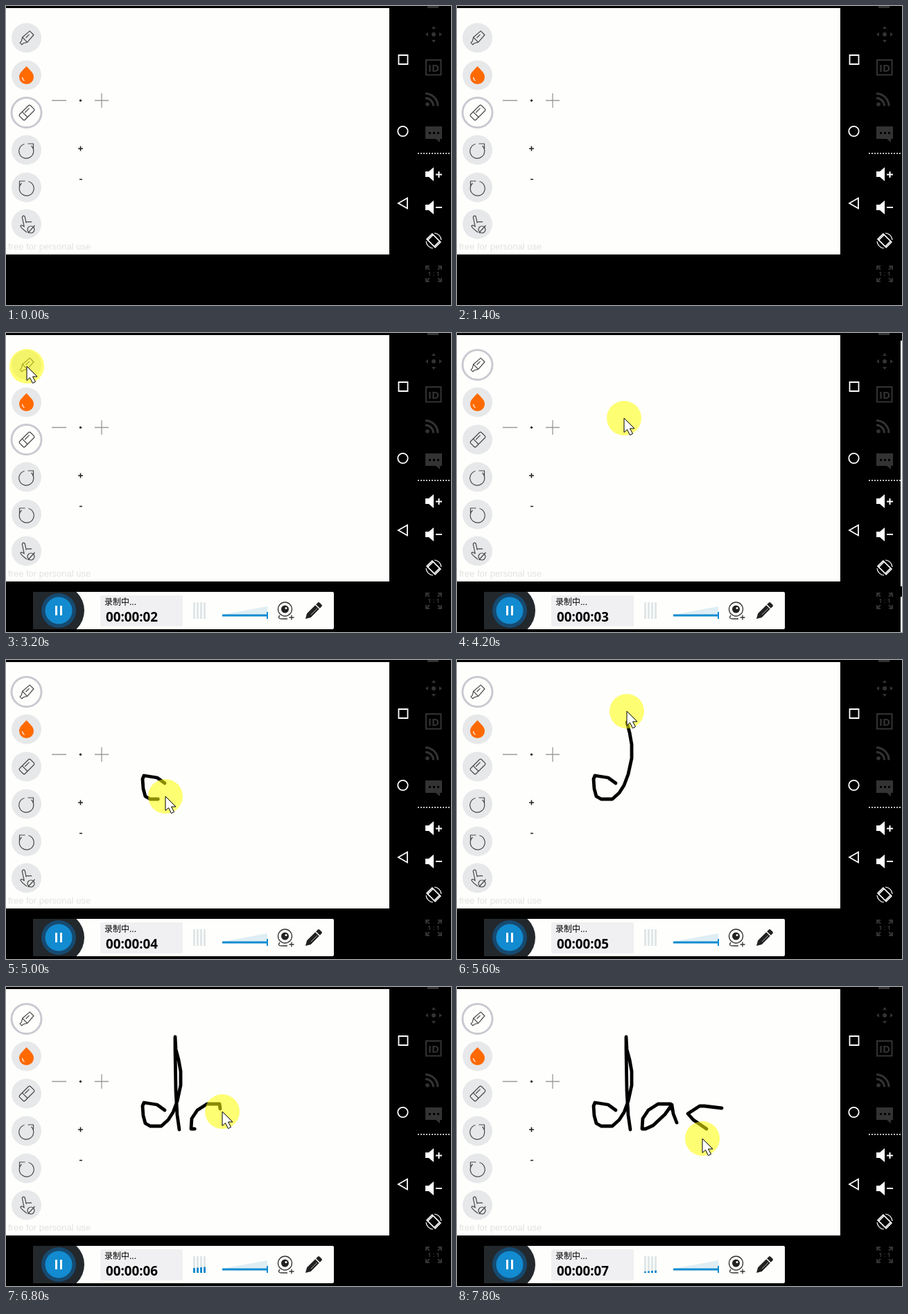
These frames come from a looping animation (642x432 px, 8000 ms). An HTML page:

```html
<!DOCTYPE html>
<html lang="en">
<head>
<meta charset="utf-8">
<title>Drawing board recording</title>
<style>
  html, body { margin: 0; width: 100%; height: 100%; overflow: hidden; background: #000; }
  svg { display: block; width: 642px; height: 432px; }
  .paper { fill: #fefefc; }
  .line { fill: none; stroke: #484848; stroke-width: 1.2; stroke-linejoin: round; }
  .disc { fill: #e7e8e9; }
  .on .disc { fill: #fefefc; stroke: #c9c9d1; stroke-width: 3; }
  .dim { fill: #333; }
  .dimLine { fill: none; stroke: #333; stroke-width: 2; }
  .nav { fill: none; stroke: #fff; stroke-width: 1.8; }
  .ink { fill: none; stroke: #000; stroke-width: 4.8; stroke-linecap: round; stroke-linejoin: round; }
</style>
</head>
<body>
<svg viewBox="0 0 642 432">
  <defs>
    <path id="speaker" fill="#fff" d="M-12-4h5l7-6v20l-7-6h-5z"/>
    <g id="turn" class="line">
      <path d="M7-7A10.500 10.500 0 1 1-3-9.500"/>
      <path d="M2-10h8v8"/>
    </g>
    <clipPath id="panelClip"><rect x="39" y="374" width="434" height="54"/></clipPath>
  </defs>
  <rect width="642" height="432"/>
  <rect class="paper" y="3" width="553" height="356"/>

  <!-- drawing tools -->
  <g id="pen" transform="translate(29.5 46)">
    <circle class="disc" r="21.5"/>
    <path class="line" transform="translate(.5 0) rotate(45)" d="M-4-10h8l1 14h-10zM-5 4h10l-3 5v3h-4v-3zM-1-6v7"/>
  </g>
  <g transform="translate(29.5 100)">
    <circle class="disc" r="21.5"/>
    <path fill="#ff6a00" d="M0-13C4-8 10.500-4 10.500 2.500A10.500 10.500 0 0 1-10.500 2.500C-10.500-4-4-8 0-13z"/>
    <path d="M-6 3a7 7 0 0 0 3 5" fill="none" stroke="#fff" stroke-width="1.300"/>
  </g>
  <g id="eraser" transform="translate(29.5 154)">
    <circle class="disc" r="21.5"/>
    <g class="line" transform="translate(.5 0) rotate(45)">
      <rect x="-5.500" y="-11" width="11" height="22" rx="2"/>
      <path d="M-5.500 4h11M-2-7v9"/>
    </g>
  </g>
  <g transform="translate(29.5 208)">
    <circle class="disc" r="21.5"/><use href="#turn" y="1"/>
  </g>
  <g transform="translate(29.5 262)">
    <circle class="disc" r="21.5"/><use href="#turn" y="1" transform="scale(-1 1)"/>
  </g>
  <g transform="translate(29.5 315)">
    <circle class="disc" r="21.5"/>
    <path class="line" transform="rotate(-12)" d="M-2 12C-5 8-9 4-9 1q2-2 5 2V-11q2-3 4 0V-2q2-2 4 0q2-1 4 1"/>
    <circle class="line" cx="6.500" cy="8" r="5"/><path class="line" d="M2 13 12 2"/>
  </g>

  <path stroke="#999" stroke-width="1.300" d="M66 136.500h21M128 136.500h20M138 126v21"/>
  <circle cx="107.500" cy="136.500" r="1.600"/>
  <path stroke="#222" stroke-width="1.600" d="M104 206h7M107.500 202.500v7M106 250.500h4"/>
  <text x="3" y="352" font-size="13" fill="#e2e2e0" font-family="Liberation Sans, sans-serif">free for personal use</text>

  <!-- phone buttons and side bar -->
  <path class="nav" d="M566.500 71h13v13h-13zM566 285l13-7.500v15z"/>
  <circle class="nav" cx="572.500" cy="181" r="7.200"/>
  <rect class="dim" x="608" width="16" height="3"/>
  <g class="dim" transform="translate(617 41)">
    <circle r="3"/>
    <path d="M0-12l3 4h-6zM0 12l3-4h-6zM-12 0l4-3v6zM12 0l-4-3v6z"/>
  </g>
  <rect class="dimLine" x="606" y="78" width="21.500" height="21.500"/>
  <text class="dim" x="617" y="94.500" font-size="15" font-weight="700" text-anchor="middle" font-family="Open Sans, sans-serif">ID</text>
  <circle class="dim" cx="608" cy="142" r="2.800"/>
  <path class="dimLine" style="stroke-width:3" d="M605 133a11.500 11.500 0 0 1 11.500 11.500M605 126.500a18 18 0 0 1 18 18"/>
  <path class="dim" d="M605 174h24v18h-3v5l-6-5h-15z"/>
  <path stroke="#000" stroke-width="3" stroke-dasharray="3 3" d="M610 183.500h15"/>
  <path stroke="#fff" stroke-width="1.600" stroke-dasharray="2 2" d="M594 213h46"/>
  <use href="#speaker" x="617" y="243"/>
  <use href="#speaker" x="617" y="291"/>
  <path stroke="#fff" stroke-width="2" d="M620 243.500h9M624.500 239v9M620 291h9"/>
  <g transform="translate(617 339)" class="nav">
    <path transform="rotate(-45)" d="M-5.500-8.500h11v17h-11zM-5.500-6.500h11M-5.500 6.500h11" stroke-width="1.600"/>
    <path d="M1-11a11 11 0 0 1 10 10M-1 11a11 11 0 0 1-10-10" stroke-width="1.200"/>
  </g>
  <g transform="translate(617 387)">
    <path class="dimLine" d="M-11-6v-5h5M-11-11l5 5M11-6v-5h-5M11-11l-5 5M-11 6v5h5M-11 11l5-5M11 6v5h-5M11 11l-5-5"/>
    <text class="dim" y="3" font-size="9" font-weight="700" text-anchor="middle" font-family="Open Sans, sans-serif">1 : 1</text>
  </g>
  <path id="edge" stroke="#fff" stroke-width="2" d="M641 11V366M641 381V432"/>

  <!-- handwriting -->
  <path class="ink" pathLength="1" d="M229 178 218 170 199 167 197 172 198 186 201 197 208 201 224 201 234 192 241 181 247 165 252 142 252 122 249 105 245 90 244 72 244 90 245 150 247 185 250 206"/>
  <path class="ink" pathLength="1" d="M309 176 308 169 290 169 276 178 268 190 267 205 272 205 283 200 300 184 310 170 312 183 317 196"/>
  <path class="ink" pathLength="1" d="M382 175 357 172 350 172 333 183 341 192 360 205"/>

  <!-- recorder -->
  <g id="recorder">
    <rect class="paper" x="39" y="374" width="434" height="54" rx="2"/>
    <g clip-path="url(#panelClip)" fill="#23282c">
      <path d="M39 374h37v54H39z"/><circle cx="76" cy="401" r="37"/>
    </g>
    <circle cx="76" cy="401" r="25" fill="#174a70"/>
    <circle cx="76" cy="401" r="19.500" fill="#128bd0"/>
    <path stroke="#fff" stroke-width="3" d="M72.500 394v14M79.500 394v14"/>
    <rect x="136" y="379" width="119" height="45" rx="2" fill="#f0f0f2"/>
    <text x="142" y="393" font-size="12" font-family="Noto Sans CJK SC, Noto Sans CJK, sans-serif">录制中...</text>
    <text id="clock" x="144" y="417" font-size="18.800" font-weight="700" font-family="Open Sans, sans-serif"></text>
    <path stroke="#e0e6e8" stroke-width="3" d="M271.500 389v24M276.500 389v24M281.500 389v24M286.500 389v24"/>
    <path id="meter" stroke="#128bd0" stroke-width="3"/>
    <path fill="#deeef4" d="M312 407 377 395v12z"/>
    <path stroke="#128bd0" d="M312 408h65" stroke-width="3"/>
    <path stroke="#128bd0" stroke-width="2" d="M377 403v10"/>
    <circle cx="402.500" cy="399" r="10" fill="none" stroke="#333" stroke-width="1.300"/>
    <circle cx="402.500" cy="399" r="5.500" fill="#222"/>
    <circle cx="404" cy="397.500" r="1.500" fill="#fff"/>
    <path fill="none" stroke="#333" stroke-width="1.300" d="M395 408q-4 5 3 5h8M408.500 411h7M412 407.500v7"/>
    <path transform="translate(432 413) rotate(-45)" fill="#222" d="M0 0 7-4H24V4H7zM25.500-4H29q2 0 2 2v4q0 2-2 2h-3.500z"/>
    <path stroke="#aaa" d="M440 407 449 398"/>
  </g>

  <circle id="halo" r="25" fill="#ff0" fill-opacity=".54"/>
  <path id="arrow" fill="#fff" stroke="#000" d="M0 0V20.500L4.500 16.500 8.500 24.500 12.500 22.500 8.500 15H15z"/>
  <path id="move" fill="#fff" stroke="#000" d="M0-11 4-7H1.500V-1.500H7V-4L11 0 7 4V1.500H1.500V7H4L0 11-4 7H-1.500V1.500H-7V4L-11 0-7-4V-1.500H-1.500V-7H-4z"/>
</svg>
<script>
const LOOP = 8000, STEP = 200;
const $ = id => document.getElementById(id);
const inks = [...document.querySelectorAll('.ink')];

// time, x, y of the pointer
const pointer = [
  [1800, 30, 406], [2200, 52, 428], [2600, 56, 270], [3000, 36, 80], [3200, 30, 48], [3600, 30, 48],
  [4200, 241, 123], [4600, 229, 178], [4800, 198, 190], [5000, 230, 197], [5200, 250, 152],
  [5400, 252, 112], [5600, 245, 74], [5800, 246, 150], [6000, 250, 206], [6400, 309, 176],
  [6600, 276, 178], [6800, 312, 180], [7000, 317, 196], [7400, 382, 175], [7600, 338, 186], [7800, 354, 219]
];
// time, drawn share of each letter
const drawn = [
  [[4600, 0], [5600, .577], [6000, 1]],
  [[6400, 0], [6800, .49], [7000, 1]],
  [[7400, 0], [7800, 1]]
];

function at(keys, t) {
  const i = keys.findIndex(k => k[0] > t);
  if (i < 0) return keys[keys.length - 1].slice(1);
  if (i === 0) return keys[0].slice(1);
  const a = keys[i - 1], b = keys[i], p = (t - a[0]) / (b[0] - a[0]);
  return a.slice(1).map((v, j) => v + (b[j + 1] - v) * p);
}

const show = (el, on) => el.style.display = on ? '' : 'none';
const place = (el, x, y) => el.setAttribute('transform', `translate(${x} ${y})`);

function draw(t) {
  const penOn = t >= 3400;
  $('pen').classList.toggle('on', penOn);
  $('eraser').classList.toggle('on', !penOn);
  show($('edge'), penOn && t < 4800);

  inks.forEach((ink, i) => {
    const [p] = at(drawn[i], t);
    show(ink, p > 0);
    ink.style.strokeDasharray = p < 1 ? `${p} 2` : 'none';
  });

  show($('recorder'), t >= 1600);
  $('clock').textContent = '00:00:0' + Math.max(0, Math.floor((t - 500) / 1000));
  const level = t < 6000 ? 0 : 4.5 + 2.5 * Math.cos((t - 6800) / 1000 * Math.PI);
  $('meter').setAttribute('d', level
    ? [0, 1, 2, 3].map(i => `M${271.5 + 5 * i} 413v${-level - i * .5}`).join('') : '');

  const [x, y] = at(pointer, t), seen = t >= 1800, moving = t <= 2200;
  show($('halo'), seen);
  show($('arrow'), seen && !moving);
  show($('move'), seen && moving);
  place($('halo'), x - (moving ? 11 : 0), y - (moving ? 10 : 0));
  place($('arrow'), x, y);
  place($('move'), x, y);
}

function tick() {
  draw(Math.floor(performance.now() % LOOP / STEP) * STEP);
  requestAnimationFrame(tick);
}
tick();
</script>
</body>
</html>
```
